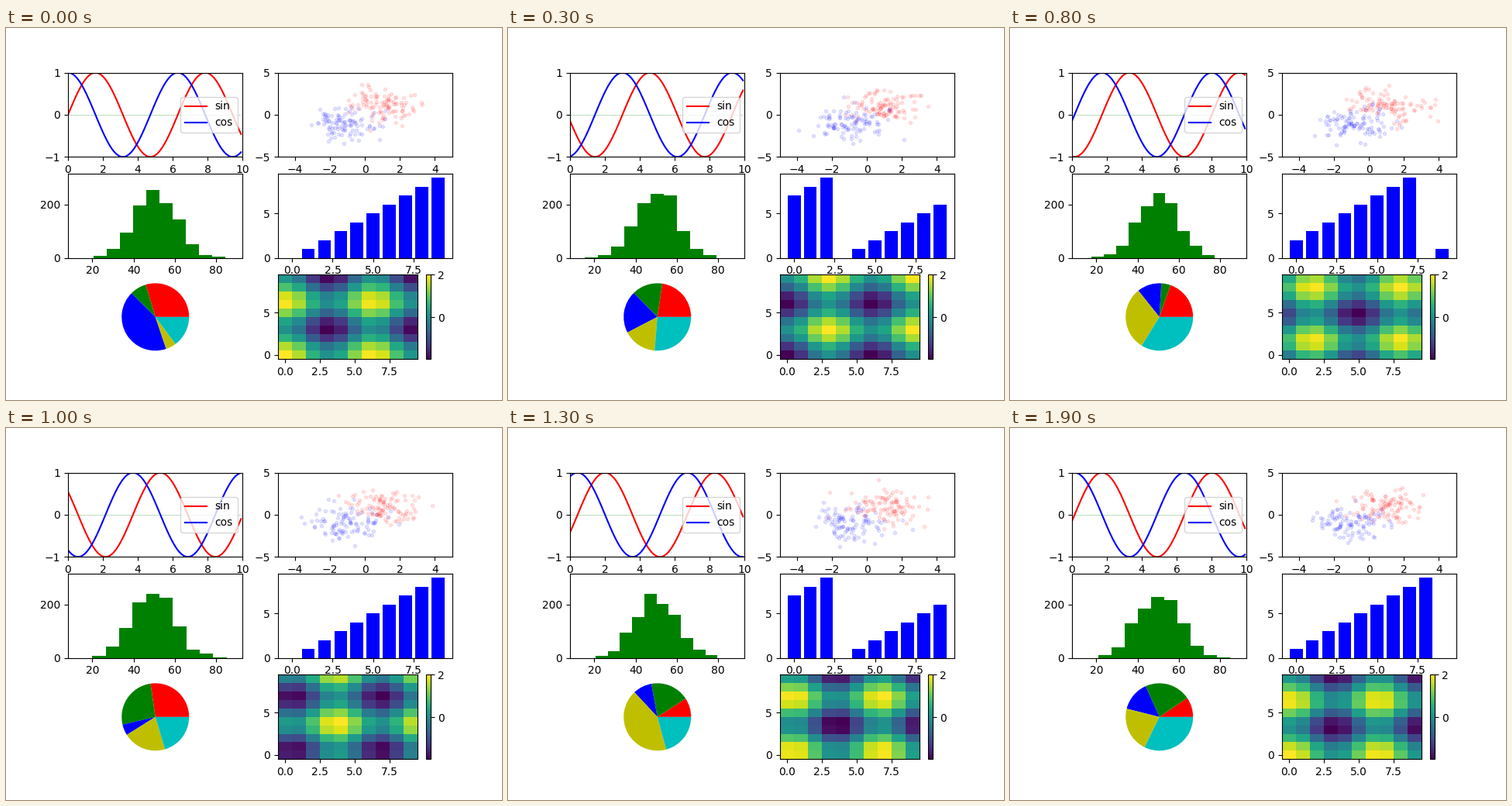
A matplotlib script for the animation above (2000 ms loop, 640 by 480 pixels).

```python
import numpy as np
import matplotlib.pyplot as plt
from matplotlib.animation import FuncAnimation
from matplotlib.colors import Normalize

FRAMES, INTERVAL = 20, 100

fig, axes = plt.subplots(3, 2, figsize=(6.4, 4.8), dpi=100)
(wave_ax, dots_ax), (hist_ax, bar_ax), (pie_ax, heat_ax) = axes


def setup(ax, xlim, ylim, xticks, yticks):
    ax.set(xlim=xlim, ylim=ylim, xticks=xticks, yticks=yticks)


x = np.arange(0, 10, 0.1)
cells = np.arange(10)

sin_line, = wave_ax.plot(x, np.sin(x), color="red")
cos_line, = wave_ax.plot(x, np.cos(x), color="blue")
wave_ax.plot(x, 0 * x, color="green", ls=":", lw=0.5)
wave_ax.legend([sin_line, cos_line], ["sin", "cos"], loc="center right")
setup(wave_ax, (0, 10), (-1, 1), range(0, 11, 2), (-1, 0, 1))

red_dots, = dots_ax.plot([], [], ".", color="red", alpha=0.1)
blue_dots, = dots_ax.plot([], [], ".", color="blue", alpha=0.1)
setup(dots_ax, (-5, 5), (-5, 5), range(-4, 5, 2), (-5, 0, 5))

hist_bars = hist_ax.bar(cells, cells, color="green", align="edge")
setup(hist_ax, (8.25, 92.85), (0, 315), (20, 40, 60, 80), (0, 200))

bars = bar_ax.bar(cells, cells, color="blue")
setup(bar_ax, (-0.89, 9.89), (0, 9.45), (0, 2.5, 5, 7.5), (0, 5))

mesh = heat_ax.pcolormesh(cells, cells, np.zeros((10, 10)),
                          shading="nearest", cmap="viridis")
setup(heat_ax, (-0.5, 9.5), (-0.5, 9.5), (0, 2.5, 5, 7.5), (0, 5))
scale = plt.cm.ScalarMappable(Normalize(2 * np.cos(3), 2), "viridis")
fig.colorbar(scale, ax=heat_ax, ticks=[0, 2])


def update(i):
    rng = np.random.default_rng(100 + i)

    sin_line.set_ydata(np.sin(x - i))
    cos_line.set_ydata(np.cos(x - i))

    red_dots.set_data(*rng.normal(1, 1, (2, 100)))
    blue_dots.set_data(*rng.normal(-1, 1, (2, 100)))

    counts, edges = np.histogram(rng.normal(50, 10, 1000), bins=10)
    for bar, left, width, count in zip(hist_bars, edges, np.diff(edges), counts):
        bar.set_bounds(left, 0, width, count)

    for bar, height in zip(bars, np.roll(cells, i)):
        bar.set_height(height)

    pie_ax.clear()
    pie_ax.pie(rng.random(5), colors=["red", "green", "blue", "y", "c"])

    wave = np.cos(cells - i)
    field = wave[:, None] + wave
    mesh.set_array(field)
    mesh.set_clim(field.min(), field.max())


anim = FuncAnimation(fig, update, frames=FRAMES, interval=INTERVAL,
                     init_func=lambda: update(0), repeat=True, repeat_delay=0)
plt.show()
```
